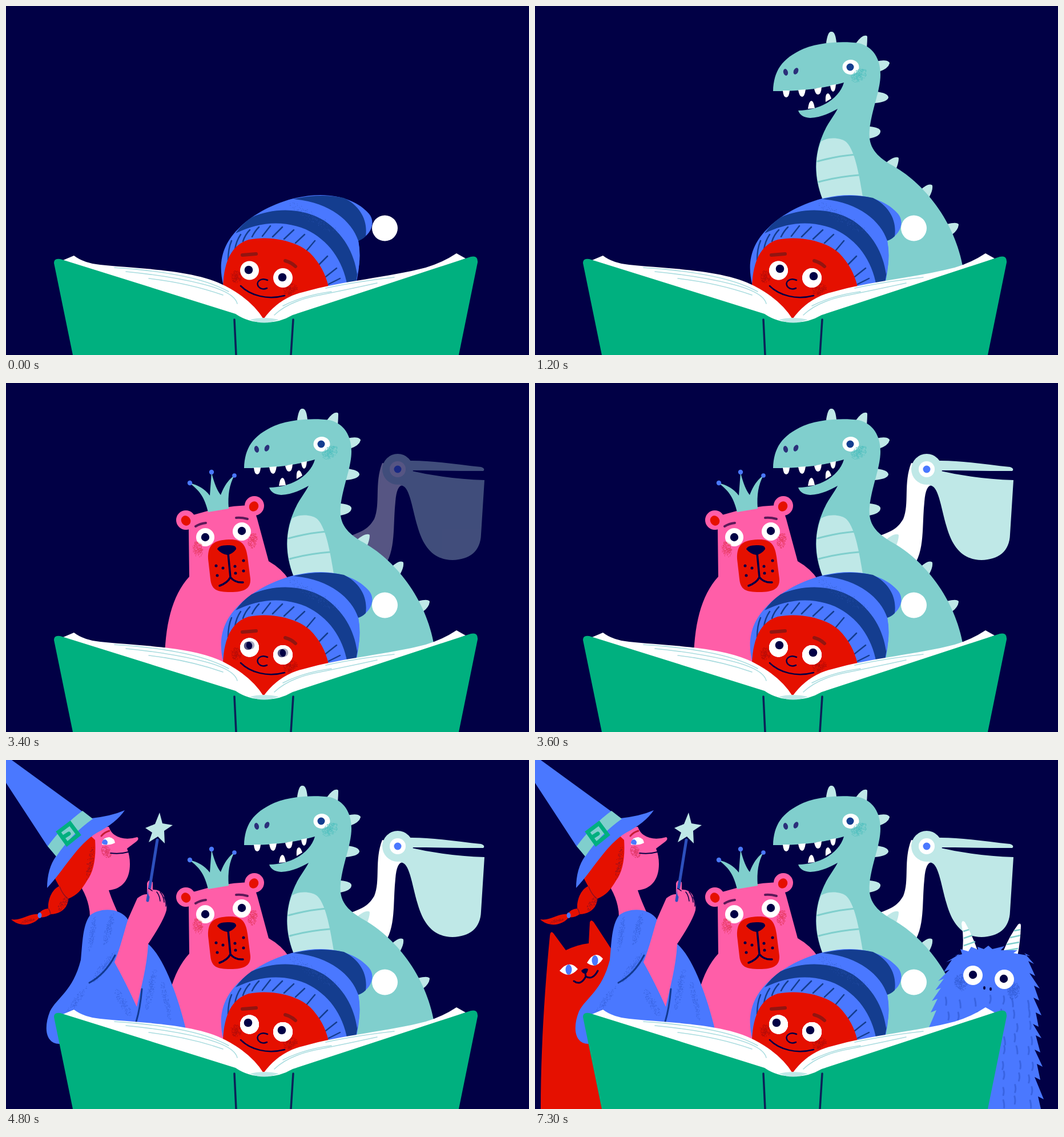
An HTML page for the animation above (8 s loop, 916x611 px).

```html
<!DOCTYPE html>
<html lang="en">
<head>
<meta charset="utf-8">
<title>Story time</title>
<style>
  html, body { margin: 0; width: 100%; height: 100%; overflow: hidden; background: #010045; }
  svg { display: block; width: 916px; height: 611px; }
  .navy { fill: #010045; } .white { fill: #fff; } .blue { fill: #4a78ff; } .red { fill: #e51000; }
  .pink { fill: #ff5ea8; } .teal { fill: #80cfcd; } .pale { fill: #bfe8e7; } .green { fill: #00b07f; }
  .dark { fill: #143d8f; }
  .line, .spray { fill: none; stroke: #010045; stroke-linecap: round; stroke-linejoin: round; }
  .line { stroke-width: 3; }
  .spray { stroke-width: 1.3; opacity: .75; }
  .spikes { stroke: #bfe8e7; stroke-width: 4; stroke-linejoin: round; }
</style>
</head>
<body>
<svg viewBox="0 0 916 611">
  <rect class="navy" width="916" height="611"/>

  <g class="scene" data-step="3">
    <path class="white" d="M659 140C645 175 656 212 645 238C634 257 622 260 600 269L668 312C682 285 678 245 682 208Q684 179 695 179L700 150Z"/>
    <path class="pale" d="M690 179C707 178 710 215 721 252C731 287 748 309 782 310C812 309 831 295 832 265L838 170Q770 168 706 153Z"/>
    <circle class="pale" cx="686" cy="151" r="27"/>
    <path class="pale" d="M704 136C745 135 790 143 832 147Q840 150 836 154C790 154 745 153 709 153Z"/>
    <circle class="white" cx="686" cy="151" r="14"/>
    <circle class="blue" cx="686" cy="151" r="6.5"/>
  </g>

  <g class="scene" data-step="6">
    <path class="red" d="M10 611C10 510 17 400 26 308Q27 298 32 303L54 333Q75 323 94 321L96 284Q98 278 103 284L133 330C133 360 124 385 120 430L150 611Z"/>
    <path class="white" d="M43 369Q60 348 75 366Q60 384 43 369ZM91 355Q105 331 119 348Q107 367 91 355Z"/>
    <ellipse class="blue" cx="59" cy="367" rx="5.5" ry="9"/>
    <ellipse class="blue" cx="105" cy="351" rx="5.5" ry="9"/>
    <path class="navy" d="M81 369Q87 363 93 366Q92 373 88 374Q83 374 81 369Z"/>
    <path class="line" d="M88 372L89 380M68 387Q80 396 89 379Q101 386 110 369"/>
  </g>

  <g class="scene" data-step="1">
    <path class="pale spikes" d="M512 64Q515 46 519 47Q524 46 526 64ZM564 66Q574 52 580 54Q580 62 579 74ZM598 99Q615 95 619 100Q617 108 602 113ZM597 152Q616 154 617 160Q615 166 595 168ZM586 213Q604 215 603 220Q602 227 585 230ZM615 277Q628 265 635 267Q635 274 630 286ZM677 323Q689 312 694 315Q695 322 689 333ZM722 384Q737 380 740 383Q739 391 730 398Z"/>
    <path class="teal" d="M417 149C418 114 432 92 470 75C500 63 540 61 567 65C592 71 605 92 605 120C605 148 590 180 586 216C583 246 596 261 622 277C682 309 736 378 750 460V490H500L504 339C488 300 489 262 503 228C512 205 521 197 530 180C514 189 500 195 482 196Q465 195 461 183C500 183 533 162 541 134C500 146 460 149 417 149Z"/>
    <path class="pale" d="M504 339C489 298 490 265 501 237C511 230 535 229 546 239C560 254 567 291 575 340Z"/>
    <path class="line" style="stroke:#80cfcd" d="M495 272Q527 263 561 260M497 308Q530 299 567 296"/>
    <path class="white" d="M434 148H446Q445 160 440 160Q435 160 434 148ZM461 147L474 146Q472 159 468 159Q463 159 461 147ZM489 145L502 142Q501 155 496 155Q491 155 489 145ZM517 139L527 137Q526 150 522 150Q518 149 517 139ZM478 180Q480 166 484 166Q488 166 490 179ZM509 168Q508 153 513 153Q516 153 519 162Z"/>
    <g fill="#2b2f7a">
      <ellipse cx="439" cy="116" rx="4" ry="6" transform="rotate(-15 439 116)"/>
      <ellipse cx="457" cy="114" rx="4" ry="6" transform="rotate(25 457 114)"/>
    </g>
    <ellipse class="white" cx="553" cy="107" rx="14.5" ry="13"/>
    <circle class="dark" cx="552" cy="107" r="6.5"/>
    <path class="spray" style="stroke:#45bcbb" data-area="567 122 16 10 260 -35"/>
  </g>

  <g class="scene" data-step="2">
    <g class="pink">
      <circle cx="315" cy="240" r="17"/>
      <circle cx="435" cy="215" r="17"/>
      <path d="M278 500C277 430 289 374 321 339L320 258Q320 238 328 231Q375 216 424 214Q436 222 440 238L460 312Q483 325 496 345L560 510Z"/>
    </g>
    <ellipse class="red" cx="315" cy="241" rx="8" ry="9" transform="rotate(-35 315 241)"/>
    <ellipse class="red" cx="434" cy="216" rx="8" ry="9" transform="rotate(30 434 216)"/>
    <path class="teal" d="M354 226C348 200 338 187 321 175Q344 180 357 197L360 157Q367 185 376 196Q385 172 400 162Q387 185 390 220Z"/>
    <g class="blue"><circle cx="322" cy="175" r="4.2"/><circle cx="360" cy="156" r="4.2"/><circle cx="400" cy="162" r="3.8"/></g>
    <path class="line" style="stroke:#5b1a58;stroke-width:4" d="M332 251Q340 246 350 245M403 236Q412 235 423 238"/>
    <g class="white"><circle cx="349" cy="270" r="16"/><circle cx="413" cy="260" r="16"/></g>
    <g class="navy"><circle cx="349" cy="270" r="7.2"/><circle cx="413" cy="259" r="7.2"/></g>
    <path class="spray" style="stroke:#e0324f" data-area="336 291 9 14 200 -10"/>
    <path class="spray" style="stroke:#e0324f" data-area="432 276 8 14 180 10"/>
    <path class="red" d="M354 308C353 281 366 275 390 274C413 273 420 283 423 304L428 343C429 361 416 366 393 366C369 366 360 362 358 343Z"/>
    <path class="navy" d="M370 291Q372 284 388 284Q404 283 403 291Q397 299 388 301Q378 300 370 291Z"/>
    <path class="line" style="stroke-width:3.5" d="M389 298L393 340M374 355Q388 350 393 340Q401 350 415 349"/>
    <path class="line" style="stroke-width:5" d="M368 320h0M380 324h0M370 337h0M401 321h0M416 311h0M402 333h0M416 329h0"/>
  </g>

  <g class="scene" data-step="4">
    <path class="pink" d="M150 118L180 117Q184 127 190 131Q206 142 230 135Q234 138 228 143L212 155Q217 168 217 182C217 210 203 226 180 228Q185 244 197 270L147 275Q147 250 133 225Z"/>
    <path class="red" d="M156 140C158 170 154 195 142 211C132 228 124 237 109 243C109 258 96 270 78 270Q69 277 59 275C50 289 25 294 9 279C28 282 40 268 57 270Q62 261 74 260C73 244 81 226 93 221L86 208L98 180L140 125Z"/>
    <path class="line" style="stroke-width:1.5;stroke:#8c1020" d="M94 222Q100 237 109 243M74 260Q77 263 78 270"/>
    <ellipse class="blue" cx="59" cy="272" rx="3.5" ry="5"/>
    <path class="spray" style="stroke:#8c1020" data-area="147 180 5 30 120 10"/>
    <path class="spray" style="stroke:#8c1020" data-area="100 252 6 14 80 35"/>
    <path class="spray" style="stroke:#8c1020" data-area="38 282 13 3 50 -15"/>
    <path class="white" d="M168 148Q168 136 181 135Q190 137 191 145Q182 150 168 148Z"/>
    <path class="blue" d="M168 146Q168 139 174 139Q180 142 177 148Q172 149 168 146Z"/>
    <path class="line" style="stroke-width:2" d="M183 163Q200 165 214 161"/>
    <path class="line" style="stroke:#c41c35" d="M167 133Q173 126 181 124"/>
    <path class="spray" style="stroke:#d82f55" data-area="176 161 8 12 180 -30"/>
    <path class="blue" d="M0 0H10L150 102Q185 98 208 88Q193 110 160 127C125 147 100 195 72 224Q72 190 88 168L72 150L0 40Z"/>
    <path class="teal" d="M134 89L152 103Q114 130 88 169L73 151Q101 113 134 89Z"/>
    <path class="line" style="stroke:#00b07f;stroke-width:7;stroke-linejoin:miter" d="M92 126L112 111L127 131L107 147ZM99 136L110 129"/>
    <path class="blue" d="M147 272C166 257 202 259 214 280L249 322C276 345 301 412 316 475L330 500L95 497C70 498 65 470 77 440C90 415 117 405 131 350C134 320 134 290 147 272Z"/>
    <g style="opacity:.75">
      <path class="spray" style="stroke:#2f58cf" data-area="180 296 6 30 180 15"/>
      <path class="spray" style="stroke:#2f58cf" data-area="151 305 5 32 140 8"/>
      <path class="spray" style="stroke:#2f58cf" data-area="172 362 7 34 180 38"/>
      <path class="spray" style="stroke:#2f58cf" data-area="121 425 6 35 130 35"/>
      <path class="spray" style="stroke:#2f58cf" data-area="205 425 7 28 130 -30"/>
      <path class="spray" style="stroke:#2f58cf" data-area="254 400 6 38 180 12"/>
      <path class="spray" style="stroke:#2f58cf" data-area="280 420 5 38 130 -12"/>
    </g>
    <path class="line" style="stroke:#123a91" d="M146 390Q174 375 191 342M238 401Q235 435 228 458"/>
    <path class="pink" d="M230 242Q240 234 247 235L247 216Q250 207 257 214L257 227Q268 226 275 235Q283 248 281 263Q276 282 249 322C247 362 236 400 229 432Q210 390 190 354C200 330 207 300 214 278Z"/>
    <path class="line" style="stroke:#2d50bd;stroke-width:5" d="M265 140L248 246"/>
    <path class="pink" d="M249 226Q258 224 261 231L254 242Q248 238 249 226Z"/>
    <path class="line" style="stroke-width:1.5" d="M264 231Q269 237 270 247M270 231Q276 238 277 249M277 240Q281 247 280 256M250 225L256 229"/>
    <path class="pale" d="M269 92L274 111L292 114L277 124L278 146L266 134L250 144L256 127L244 119L261 112Z"/>
  </g>

  <g class="scene" data-step="5">
    <g class="white">
      <path d="M748 340Q752 311 747 287Q748 279 753 284Q766 307 775 333Z"/>
      <path d="M821 333Q831 308 846 288Q851 284 851 291Q850 319 845 343Z"/>
    </g>
    <path class="line" style="stroke:#80cfcd;stroke-width:2.5;stroke-linecap:butt" d="M750 300L760 297M751 312L766 307M751 325L771 318M839 299L850 297M832 311L850 307M826 323L848 319M823 334L846 330"/>
    <path id="fur" class="blue"/>
    <path id="strands" class="line" style="stroke:#2f58cf;stroke-width:3;opacity:.6"/>
    <path class="spray" style="stroke:#2f58cf" data-area="746 389 11 15 260 -10"/>
    <path class="spray" style="stroke:#2f58cf" data-area="838 404 11 15 260 10"/>
    <g class="white"><circle cx="767" cy="377" r="17"/><circle cx="822" cy="384" r="17"/></g>
    <g class="navy"><circle cx="767" cy="376" r="7.2"/><circle cx="821" cy="383" r="7.2"/>
      <ellipse cx="787" cy="399" rx="2" ry="3"/><ellipse cx="798" cy="401" rx="2" ry="3"/></g>
  </g>

  <path class="blue" d="M381 490C370 448 380 415 410 387C440 358 495 331 551 331C590 331 620 345 636 364C647 377 642 400 617 411Q623 448 612 490Z"/>
  <path class="dark" d="M402 398Q413 382 430 370C470 352 520 353 558 376C593 400 615 440 616 466L612 490H598C590 445 565 410 525 391C480 373 440 380 402 398Z"/>
  <path class="blue" d="M428 371C470 350 520 353 558 376C590 398 610 432 615 470Q623 440 617 411L590 370L500 338Z"/>
  <path class="dark" d="M503 338Q550 327 592 336C620 350 634 375 630 403Q624 409 617 411C605 375 565 343 503 338Z"/>
  <path class="spray" style="stroke:#2c55b5;stroke-width:1;opacity:.6" data-area="540 372 9 52 140 -58"/>
  <path class="line" style="stroke:#143d8f;stroke-width:2.5" d="M389 445Q389 425 395 411M401 426Q403 412 411 400M415 412Q419 400 427 392M431 404Q436 394 443 387M449 403L463 385M467 404L484 387M487 408L504 392M507 415L523 400M525 430L541 411M546 455L563 438M560 474L579 459M565 487L585 477"/>
  <path class="red" d="M380 490C382 445 396 418 425 409C460 402 505 409 532 432C550 450 560 470 565 492L451 560Z"/>
  <path class="spray" style="stroke:#a50b0a" data-area="403 474 10 11 150 0"/>
  <path class="spray" style="stroke:#a50b0a" data-area="498 496 13 10 180 -20"/>
  <path class="line" style="stroke:#921510;stroke-width:6" d="M414 436L438 434M489 446Q500 449 507 456"/>
  <g id="gaze"></g>
  <path class="line" style="stroke-width:2.5" d="M458 480C446 475 437 483 442 491Q448 498 457 494M411 490C428 507 458 515 488 507"/>
  <circle class="white" cx="663.5" cy="389" r="22.5"/>

  <path class="white" d="M100 445L119 437Q136 450 165 453C230 460 330 461 384 490Q430 514 451 548Q478 511 520 501C590 481 670 475 735 458Q765 449 789 433L805 442L480 565H420Z"/>
  <path class="green" d="M117 611L84 450Q84 441 95 443L402 539Q424 554 452 554Q478 555 502 541L814 439Q827 436 826 449L793 611Z"/>
  <path class="pale" d="M427 549Q451 543 478 549Q452 560 427 549Z"/>
  <path class="line" style="stroke:#a9dcdf;stroke-width:1.5" d="M190 458Q245 461 300 471T390 500M210 465Q290 473 345 487T405 521M250 477Q320 485 380 506M470 541Q495 517 545 507T650 485M485 525Q520 507 570 500M560 494Q610 483 680 475"/>
  <path class="line" style="stroke:#0b2058;stroke-width:3.5" d="M400 549L403 611M503 549L499 611"/>
</svg>
<script>
const $ = id => document.getElementById(id);
let seed = 7;
const random = () => (seed = seed * 16807 % 2147483647) / 2147483647;

// Grainy patches: dots scattered in a turned ellipse, denser in the middle.
for (const patch of document.querySelectorAll('.spray')) {
  const [x, y, rx, ry, count, turn] = patch.dataset.area.split(' ').map(Number);
  let d = '';
  for (let i = 0; i < count; i++) {
    const angle = random() * 2 * Math.PI, r = random() ** .7;
    d += `M${(r * rx * Math.cos(angle)).toFixed(1)} ${(r * ry * Math.sin(angle)).toFixed(1)}h.1`;
  }
  patch.setAttribute('d', d);
  patch.setAttribute('transform', `translate(${x} ${y}) rotate(${turn})`);
}

// Fur: every tuft is a tip with a notch just inside and above it.
const left = [[690, 468], [693, 442], [695, 422], [701, 403], [706, 387], [716, 371], [720, 354], [735, 343]];
const right = [[867, 343], [874, 357], [876, 378], [884, 400], [883, 421], [887, 447], [882, 467],
  [887, 487], [885, 512], [889, 537], [885, 560], [891, 594]];
$('fur').setAttribute('d', 'M690 611'
  + left.map(([x, y], i) => i ? `L${x + 10} ${y - 4}L${x} ${y}` : `L${x} ${y}`).join('')
  + 'L748 340L745 331L759 335L764 327L776 332L775 327L786 331L794 325L801 331L822 326L816 333L845 333L838 338'
  + right.map(([x, y]) => `L${x} ${y}L${x - 10} ${y - 5}`).join('') + 'L886 611Z');
let strands = '';
for (let y = 412; y < 600; y += 22)
  for (let x = y < 440 ? 715 : 815; x < 865; x += 24)
    strands += `M${x + random() * 12} ${y + random() * 10}q2 7 ${random() * 3 - 1} 13`;
$('strands').setAttribute('d', strands);

// Left pupil for each scene; the right one sits at a fixed offset.
const pupils = [[425, 462], [429, 460], [424, 460], [428, 459], [424, 460], [429, 460], [423, 460]];
$('gaze').innerHTML = pupils.map(([x, y], i) => `<g class="scene" data-step="${i}">
  <g class="white"><circle cx="426.5" cy="463" r="16.5"/><circle cx="485" cy="476" r="17"/></g>
  <g class="navy"><circle cx="${x}" cy="${y}" r="7.3"/><circle cx="${x + 59}" cy="${y + 13}" r="7.3"/></g></g>`).join('');

const scenes = [...document.querySelectorAll('.scene')];
function fade(step, t) {
  if (!step) return 1;
  const ticks = Math.floor((t - 1000 - (step - 1) * 1200) / 100) + 1;
  return Math.max(0, Math.min(1, ticks / (step === 6 ? 4 : 3)));
}
function draw(now) {
  const t = now % 8000;
  for (const scene of scenes) scene.style.opacity = fade(+scene.dataset.step, t);
  requestAnimationFrame(draw);
}
draw(performance.now());
</script>
</body>
</html>
```
